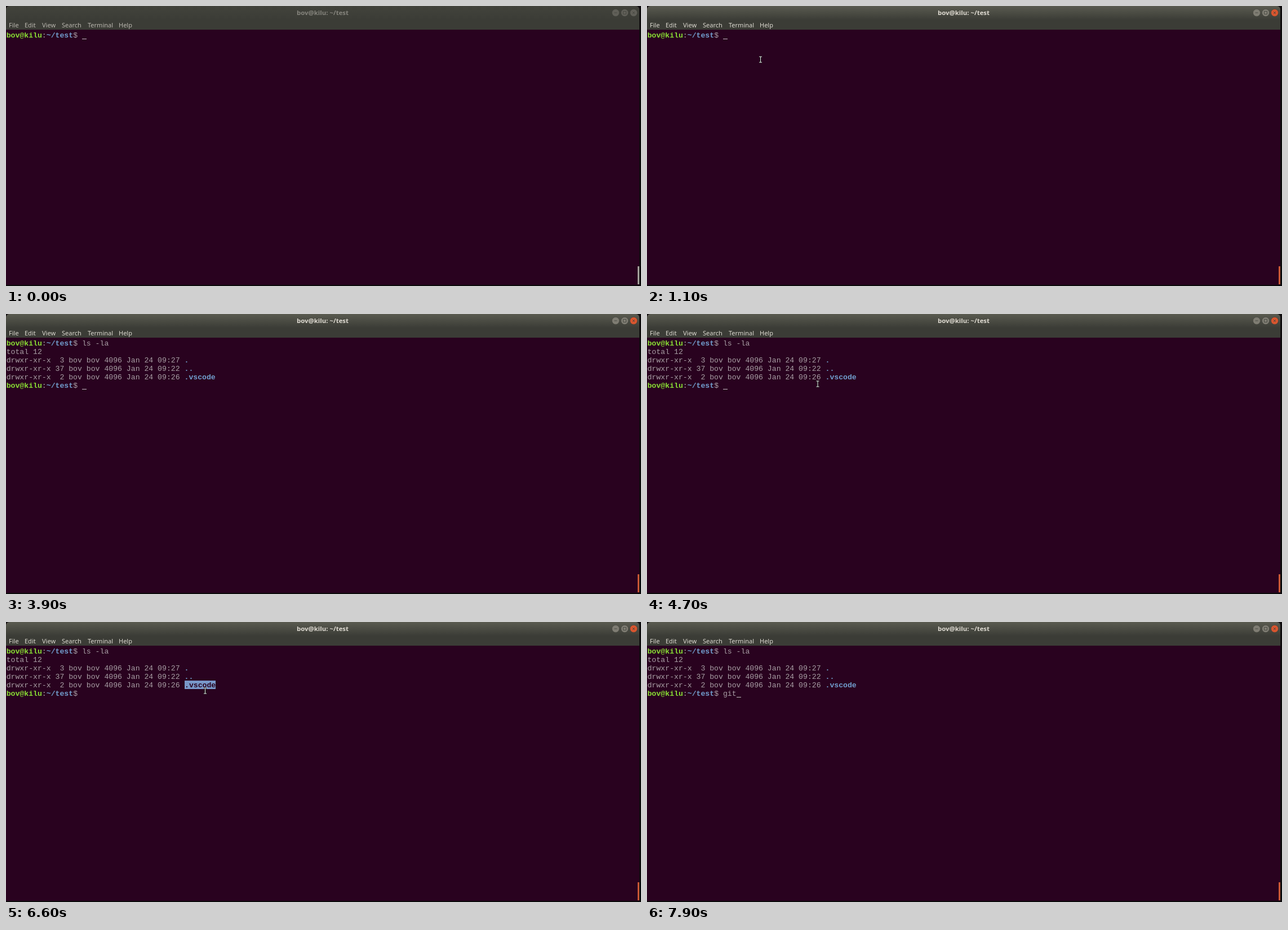
An HTML page that plays this animation: 1127x497 px, repeating every 8000 ms.

```html
<!DOCTYPE html>
<html lang="en">
<head>
<meta charset="utf-8">
<title>Terminal</title>
<style>
  html, body { margin: 0; width: 100%; height: 100%; overflow: hidden; background: #0d0b0c; }
  #win {
    --f: 0%;
    position: absolute; left: 0; top: 0; width: 1124px; height: 495px;
    overflow: hidden; border-radius: 6px 6px 0 0; background: #29021f;
  }
  #win * { position: absolute; margin: 0; white-space: pre; }
  #bar {
    width: 100%; height: 42px;
    background: linear-gradient(
      color-mix(in srgb, #5a5b50 var(--f), #42433c),
      #3b3c36 25px, #3b3c36);
    font: 11px/16px "Noto Sans", "Open Sans", sans-serif;
    color: color-mix(in srgb, #dcd9d0 var(--f), #bab7af);
  }
  #bar span { top: 26px; }
  #bar h1 {
    left: 0; width: 100%; top: 4px; text-align: center;
    font-size: 11.4px; font-weight: bold;
    color: color-mix(in srgb, #dfdbd2 var(--f), #85847d);
  }
  #buttons { left: 1070px; top: 0; }
  #buttons circle { fill: color-mix(in srgb, #7f7d73 var(--f), #605f58); stroke: #3b3c36; stroke-width: .5; }
  #buttons circle.close { fill: color-mix(in srgb, #d9562f var(--f), #605f58); }
  #buttons path { fill: none; stroke: #45463f; stroke-width: .9; }
  #scroll {
    left: 1121px; top: 462px; width: 3px; height: 32px;
    background: color-mix(in srgb, #c95735 var(--f), #a3a09b);
  }
  #screen, #select b { font: 13.16px/15px "Liberation Mono", monospace; }
  #screen { left: .7px; top: 45px; color: #a99fa5; }
  #screen b { position: static; color: #8ae234; }
  #screen .dir { color: #729fcf; }
  #select { left: 317px; top: 104px; height: 15px; overflow: hidden; background: #7897c8; }
  #select b { left: 0; top: 1px; color: #29021f; font-weight: bold; }
  #caret { width: 8px; height: 1px; background: #c4bcc1; }
  #pointer { left: 0; top: 0; overflow: visible; }
  #pointer path { fill: none; stroke: #eee; }
  #pointer .edge { stroke: #111; stroke-width: 2.6; }
  #pointer .arrow { fill: #111; }
</style>
</head>
<body>
<div id="win">
  <div id="bar">
    <h1>bov@kilu: ~/test</h1>
    <span style="left:5px">File</span>
    <span style="left:33px">Edit</span>
    <span style="left:64px">View</span>
    <span style="left:99px">Search</span>
    <span style="left:145px">Terminal</span>
    <span style="left:200px">Help</span>
    <svg id="buttons" width="54" height="24">
      <circle cx="12" cy="12" r="6.5"/>
      <circle cx="28" cy="12" r="6.5"/>
      <circle cx="44" cy="12" r="6.5" class="close"/>
      <path d="M9.5 12h5M25.5 9.5h5v5h-5zM42 10l4 4M46 10l-4 4"/>
    </svg>
  </div>
  <pre id="screen"></pre>
  <div id="select"><b>.vscode</b></div>
  <div id="caret"></div>
  <div id="scroll"></div>
  <svg id="pointer" width="1" height="1">
    <g id="beam">
      <path class="edge" d="M-2.5-5H2.5M0-5V5M-2.5 5H2.5"/>
      <path d="M-2.5-5H2.5M0-5V5M-2.5 5H2.5"/>
    </g>
    <path id="arrow" class="arrow" d="M0 0V12L3 9.5 5 14 7 13 5 9H9Z"/>
  </svg>
</div>
<script>
// All times are in ticks of 100 ms
const TICK = 100, LOOP = 80, CELL = 7.9, ROW = 15;
const ENTER = 35, OUTPUT = 39, PRESS = 58, RELEASE = 64, CLICK = 71, FOCUS = 9, BLINK = 6;
const $ = id => document.getElementById(id);
const clamp = (v, lo, hi) => Math.min(hi, Math.max(lo, v));
const show = (el, on) => el.style.display = on ? '' : 'none';

const prompt = '<b>bov@kilu</b>:<b class="dir">~/test</b>$ ';
const entry = (links, time, name) =>
  `drwxr-xr-x ${links} bov bov 4096 Jan 24 09:${time} <b class="dir">${name}</b>\n`;
const listing = 'total 12\n' + entry(' 3', 27, '.') + entry('37', 22, '..') + entry(' 2', 26, '.vscode');

// One key per tick, a dot is a pause
const keys = (start, tape) =>
  [...tape].map((key, i) => ({ key, tick: start + i })).filter(k => k.key !== '.');
const command = keys(22, 'ls. .....-l.a'), next = keys(77, 'git');
const typed = (list, tick) => list.filter(k => k.tick <= tick).map(k => k.key).join('');
const keyTicks = [...command, ...next].map(k => k.tick);
const latest = (ticks, tick) => Math.max(0, ...ticks.filter(t => t <= tick));

// Pointer strokes: start, end, control point, end point
const strokes = [
  [5, 8, 150, 260, 201.5, 95],
  [41, 47, 250, 46, 303, 124],
  [48, 50, 309, 118, 316, 113],
  [53, 56, 338, 116, 319, 111],
  [57, 59, 335, 111, 367, 112],
  [61, 64, 380, 114, 373, 117],
  [65, 70, 328, 129, 245, 146]
];

function pointerAt(tick) {
  let x = 87, y = 21;
  for (const [start, end, cx, cy, ex, ey] of strokes) {
    const t = clamp((tick - start) / (end - start), 0, 1);
    const curve = (a, c, b) => (1 - t) ** 2 * a + 2 * t * (1 - t) * c + t * t * b;
    x = curve(x, cx, ex);
    y = curve(y, cy, ey);
    if (t < 1) break;
  }
  return [x, y];
}

// The caret stays lit after a key, a click or a focus change, then blinks
function caretLit(tick) {
  const rest = latest([13, ...keyTicks, CLICK], tick);
  return !rest || Math.floor((tick - rest) / BLINK) % 2 === 0;
}

function drawText(tick) {
  const first = typed(command, tick), second = typed(next, tick);
  const done = tick >= OUTPUT;
  $('screen').innerHTML = prompt + first + '\n' + (done ? listing + prompt + second : '');

  const [row, col] = done ? [5, 17 + second.length] : tick >= ENTER ? [1, 0] : [0, 17 + first.length];
  $('caret').style.left = 1 + col * CELL + 'px';
  $('caret').style.top = 58 + row * ROW + 'px';
  show($('caret'), caretLit(tick));

  const [dragX] = pointerAt(Math.min(tick, RELEASE));
  const cells = clamp(Math.round((dragX - 317) / CELL), 0, 7);
  show($('select'), tick >= PRESS && tick < CLICK);
  $('select').style.width = cells * CELL + 'px';
}

// Typing hides the pointer until it moves again
function drawPointer(tick) {
  const [x, y] = pointerAt(tick);
  const moved = latest(strokes.map(s => s[0]), tick);
  show($('pointer'), moved > latest(keyTicks, tick));
  $('pointer').style.transform = `translate(${x}px, ${y}px)`;
  show($('arrow'), y < 42);
  show($('beam'), y >= 42);
}

function frame(now) {
  const tick = Math.floor(now / TICK) % LOOP;
  $('win').style.setProperty('--f', clamp((tick - FOCUS) * 50, 0, 100) + '%');
  drawText(tick);
  drawPointer(tick);
  requestAnimationFrame(frame);
}
frame(0);
</script>
</body>
</html>
```
